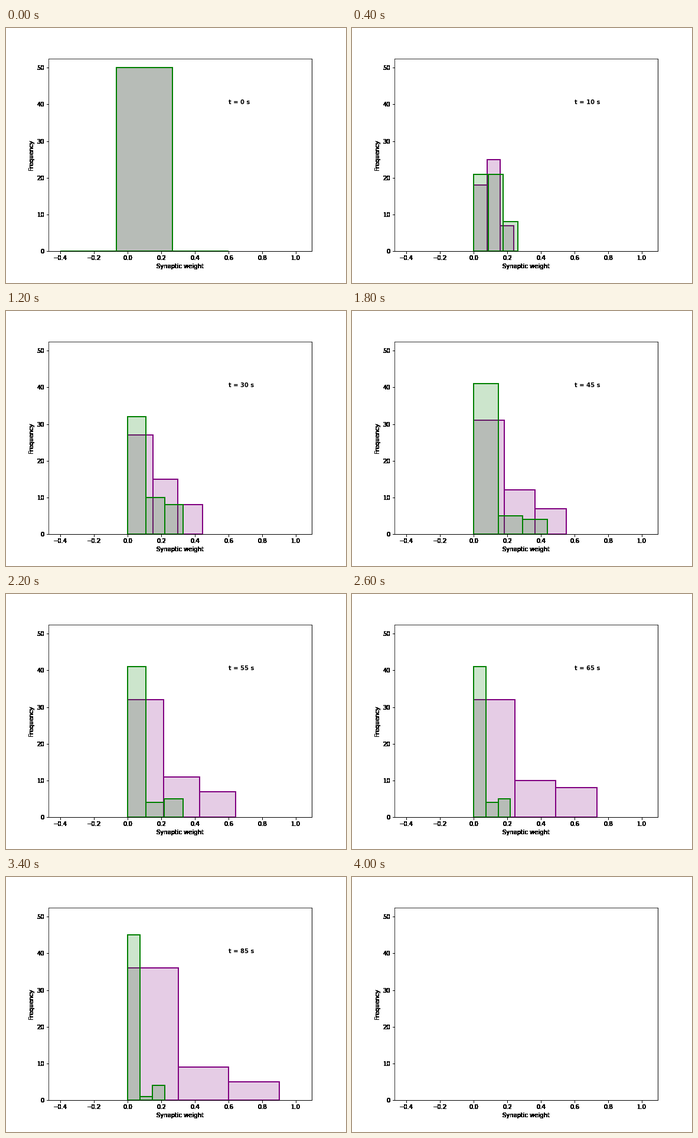
A matplotlib script that plays this animation: 576x432 px, repeating every 4200 ms.

```python
import numpy as np
import matplotlib.pyplot as plt
from matplotlib.animation import FuncAnimation

TOTAL = 50      # weights per group
STEP = 5        # simulated seconds per frame
BINS = 3
FRAMES = 21     # the last one is empty

# Key points of each spread: largest weight, first count, second count.
KEY_STEPS = [1, 4, 6, 9, 13, 15, 17, 19]
PURPLE = [
    [0.2, 0.312, 0.446, 0.549, 0.7325, 1.025, 0.901, 0.803],
    [15, 24, 27, 31, 32, 34, 36, 36],
    [27, 20, 15, 12, 10, 10, 9, 9],
]
GREEN = [
    [0.22, 0.3487, 0.329, 0.438, 0.2182, 0.22, 0.221, 0.22],
    [16, 31, 32, 41, 41, 43, 45, 48],
    [25, 13, 10, 5, 4, 3, 1, 0],
]


def solidify(artist, passes=60):
    """Overdraw an artist so its soft edges become solid."""
    base = artist.draw

    def draw(renderer):
        for _ in range(passes):
            base(renderer)

    artist.draw = draw


def make_bars(color):
    return ax.bar(np.zeros(BINS), np.zeros(BINS), align="edge",
                  facecolor=(*color, 0.2), edgecolor=color, linewidth=2)


def histogram(keys, step):
    """Return left edge, bin width and counts."""
    if step == 0:
        return -0.4, 1 / BINS, (0, TOTAL, 0)
    top, first, second = (np.interp(step, KEY_STEPS, row) for row in keys)
    first, second = round(first), round(second)
    return 0, top / BINS, (first, second, TOTAL - first - second)


fig = plt.figure(figsize=(8, 6), dpi=72, facecolor="white")
fig.subplots_adjust(left=0.125, right=0.9, bottom=0.125, top=0.88)
ax = fig.add_subplot()

groups = [
    (make_bars((0.5, 0, 0.5)), PURPLE),
    (make_bars((0, 0.5, 0)), GREEN),
]
clock = ax.text(0.6, 40, "", fontsize=10, weight="bold")

ax.set_xlim(-0.47125, 1.09625)
ax.set_ylim(0, 52.5)
ax.set_xticks(np.arange(-2, 6) / 5)
ax.set_yticks(range(0, 51, 10))
ax.set_xlabel("Synaptic weight")
ax.set_ylabel("Frequency")

for axis in (ax.xaxis, ax.yaxis):
    solidify(axis.label)
    for tick in axis.get_major_ticks():
        solidify(tick.label1)
        solidify(tick.tick1line)
for side in ("bottom", "right"):
    solidify(ax.spines[side])


def update(step):
    shown = step < FRAMES - 1
    clock.set_visible(shown)
    clock.set_text(f"t = {step * STEP} s")
    for bars, keys in groups:
        left, width, counts = histogram(keys, step)
        for i, (bar, count) in enumerate(zip(bars, counts)):
            bar.set_bounds(left + i * width, 0, width, count)
            bar.set_visible(shown)
    return []


anim = FuncAnimation(fig, update, frames=FRAMES, interval=200,
                     repeat=True, repeat_delay=0, blit=False)
plt.show()
```
